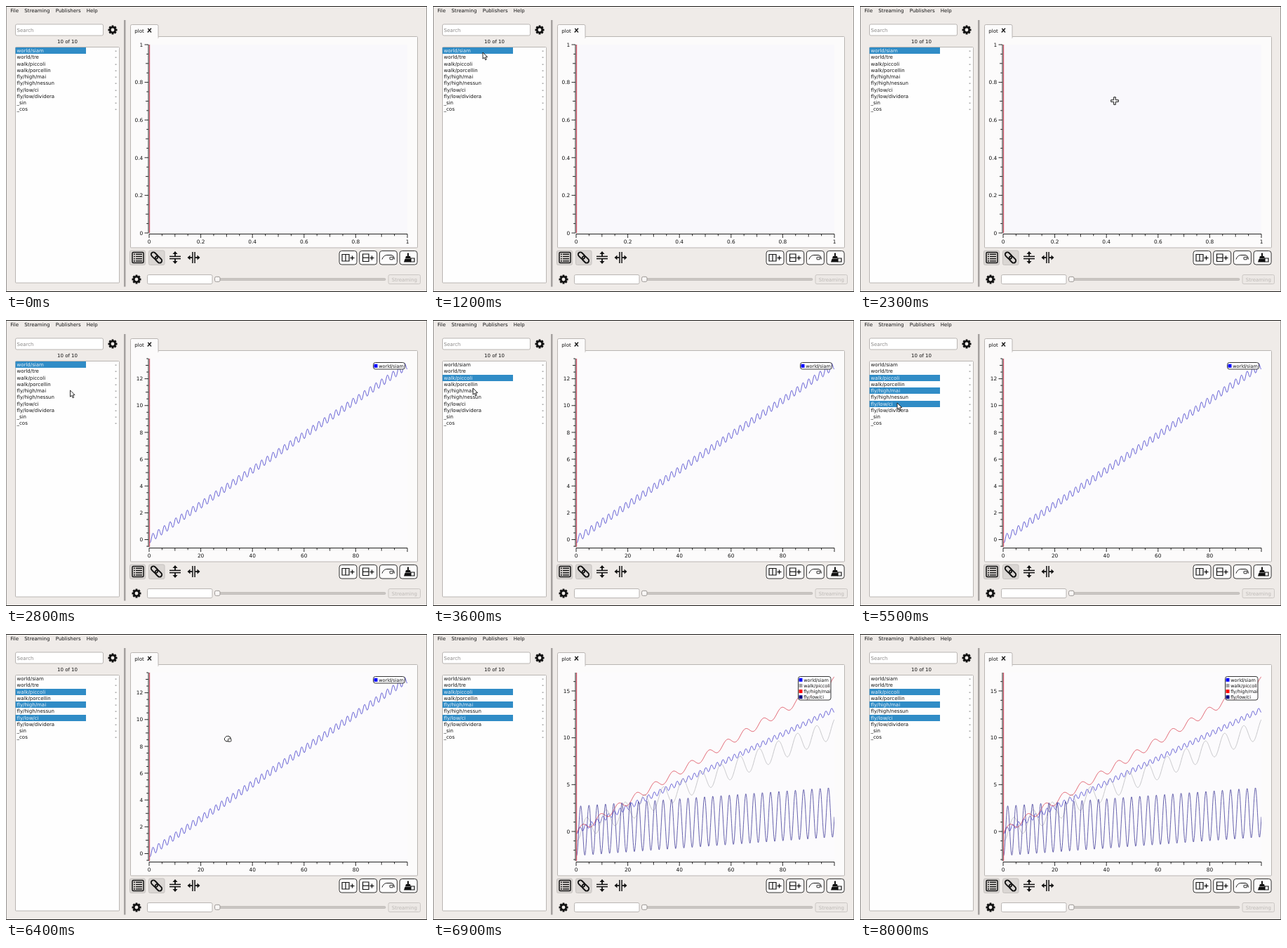
Recreate the animation shown at these times as an HTML page with a canvas. Size 600 by 407 pixels, loop 8.1 s.

```html
<!DOCTYPE html>
<html lang="en">
<head>
<meta charset="utf-8">
<title>Plot drag and drop</title>
<style>
  html, body { margin: 0; width: 100%; height: 100%; overflow: hidden; background: #efebe8; }
  canvas { display: block; width: 600px; height: 407px; }
</style>
</head>
<body>
<canvas id="stage"></canvas>
<script>
const LOOP = 8100, STEP = 100;
const canvas = document.getElementById('stage');
const ctx = canvas.getContext('2d');
const ratio = window.devicePixelRatio || 1;
canvas.width = 600 * ratio;
canvas.height = 407 * ratio;

const PLOT = { left: 204, right: 572, top: 55, bottom: 323 };
const INK = '#111', EDGE = '#b9b5b2', HIGHLIGHT = '#308cc6';
const ROWS = ['world/siam', 'world/tre', 'walk/piccoli', 'walk/porcellin', 'fly/high/mai',
  'fly/high/nessun', 'fly/low/ci', 'fly/low/dividera', '_sin', '_cos'];

// Each signal is amp * sin(freq * x + phase) + slope * x + base.
const SIGNALS = [
  { name: 'world/siam', color: '#0000ff', line: '#3a34c8', amp: 0.28, freq: 2.837, phase: -2.6, slope: 0.13, base: 0 },
  { name: 'walk/piccoli', color: '#a0a0a4', line: '#b8b8bb', amp: 1.05, freq: 0.847, phase: -1.88, slope: 0.11, base: 0 },
  { name: 'fly/high/mai', color: '#ff0000', line: '#d83040', amp: 0.4, freq: 0.897, phase: -0.55, slope: 0.162, base: -0.05 },
  { name: 'fly/low/ci', color: '#000080', line: '#403c98', amp: 2.65, freq: 1.965, phase: -1.907, slope: 0.02, base: 0.05 }
];

const VIEWS = [
  { from: 0, xMax: 1, xStep: 0.2, xMinor: 4, yMin: 0, yMax: 1, yStep: 0.2, yMinor: 4, signals: 0 },
  { from: 2400, xMax: 100, xStep: 20, xMinor: 4, yMin: -0.55, yMax: 13.5, yStep: 2, yMinor: 4, signals: 1 },
  { from: 6900, xMax: 100, xStep: 20, xMinor: 4, yMin: -3.15, yMax: 16.95, yStep: 5, yMinor: 5, signals: 4 }
];

// Pointer path: time, x, y
const PATH = [
  [500, 260, 396], [1200, 71, 66], [1500, 70, 66], [2000, 363, 135], [2400, 363, 135],
  [2900, 60, 96], [3000, 51, 91], [3100, 52, 80], [3400, 52, 80], [3600, 57, 97],
  [3700, 57, 104], [3800, 56, 100], [4300, 56, 100], [4700, 55, 121], [4900, 53, 118],
  [5900, 53, 118], [6400, 316, 149], [6900, 316, 149]
];

function rect(x, y, w, h, { fill, stroke, radius = 0, width = 1 } = {}) {
  ctx.beginPath();
  ctx.roundRect(x, y, w, h, radius);
  if (fill) { ctx.fillStyle = fill; ctx.fill(); }
  if (stroke) { ctx.strokeStyle = stroke; ctx.lineWidth = width; ctx.stroke(); }
}

function text(value, x, y, { size = 7, color = INK, align = 'left' } = {}) {
  ctx.font = `${size}px "DejaVu Sans", sans-serif`;
  ctx.textAlign = align;
  ctx.textBaseline = 'alphabetic';
  ctx.fillStyle = color;
  ctx.fillText(value, x, y + size * 0.365);
}

function line(points, color = INK, width = 1) {
  ctx.beginPath();
  points.forEach(([x, y]) => ctx.lineTo(x, y));
  ctx.strokeStyle = color;
  ctx.lineWidth = width;
  ctx.stroke();
}

function shape(points, fill, stroke, width = 1) {
  ctx.beginPath();
  points.forEach(([x, y]) => ctx.lineTo(x, y));
  ctx.closePath();
  if (fill) { ctx.fillStyle = fill; ctx.fill(); }
  if (stroke) { ctx.strokeStyle = stroke; ctx.lineWidth = width; ctx.stroke(); }
}

function at(x, y, angle, draw) {
  ctx.save();
  ctx.translate(x, y);
  ctx.rotate(angle);
  draw();
  ctx.restore();
}

function gear(x, y) {
  for (let i = 0; i < 4; i++) {
    at(x, y, i * Math.PI / 4, () => rect(-1.5, -6.5, 3, 13, { fill: INK, radius: 0.6 }));
  }
  ctx.beginPath();
  ctx.arc(x, y, 4.9, 0, 7);
  ctx.fillStyle = INK;
  ctx.fill();
  ctx.beginPath();
  ctx.arc(x, y, 2.4, 0, 7);
  ctx.fillStyle = '#efebe8';
  ctx.fill();
}

function splitArrows(x, y, angle) {
  at(x, y, angle, () => {
    line([[-8, -1.6], [8, -1.6]], INK, 1.5);
    line([[-8, 1.6], [8, 1.6]], INK, 1.5);
    for (const side of [-1, 1]) {
      line([[0, side * 2], [0, side * 6]], INK, 1.8);
      shape([[-3.5, side * 5], [3.5, side * 5], [0, side * 9]], INK);
    }
  });
}

function plus(x, y) {
  line([[x - 3, y], [x + 3, y]], INK, 1.3);
  line([[x, y - 3], [x, y + 3]], INK, 1.3);
}

function toolbar() {
  rect(176.5, 348, 22, 20.5, { fill: '#dad6d3', stroke: '#c6c2bf', radius: 2 });
  rect(180, 350.5, 16, 15, { stroke: INK, radius: 1.5, width: 1.5 });
  for (let i = 0; i < 4; i++) {
    const y = 353.3 + i * 3.2;
    rect(182, y - 0.8, 1.8, 1.6, { fill: INK });
    line([[185, y], [194, y]], INK, 1.4);
  }
  rect(203.5, 348, 22.5, 20.5, { fill: '#dad6d3', stroke: '#c6c2bf', radius: 2 });
  at(214.5, 358, Math.PI / 4, () => {
    for (const x of [-9.5, -1.5]) rect(x, -3.2, 11, 6.4, { stroke: INK, radius: 3.2, width: 1.9 });
  });
  splitArrows(241, 358, 0);
  splitArrows(267.5, 358, Math.PI / 2);

  for (let i = 0; i < 4; i++) {
    rect(475 + i * 28.7, 348.5, 25, 19.5, { fill: '#fdfcfc', stroke: '#333', radius: 3.5 });
  }
  rect(479, 353.5, 10, 9.5, { stroke: INK, width: 1.2 });
  line([[484, 353], [484, 363]], INK, 1.2);
  plus(493.5, 358.5);
  rect(508.5, 353, 8.5, 10.5, { stroke: INK, width: 1.2 });
  line([[508, 358.2], [517, 358.2]], INK, 1.2);
  plus(521.5, 358.5);

  ctx.beginPath();
  ctx.moveTo(536, 360.5);
  ctx.bezierCurveTo(538, 355, 541, 354.5, 544, 354.5);
  ctx.lineTo(549, 354.5);
  ctx.quadraticCurveTo(553, 355, 553.5, 360.5);
  ctx.strokeStyle = INK;
  ctx.lineWidth = 1;
  ctx.stroke();
  rect(547, 357.3, 4.5, 3.5, { fill: '#fff', stroke: INK, radius: 0.6, width: 0.9 });

  line([[573, 351.5], [573, 357]], INK, 2);
  shape([[570, 356], [576, 356], [577, 359.5], [569, 359.5]], INK);
  shape([[568.5, 360], [577, 360], [577, 364.5], [567, 364.5]], INK);
  rect(577, 359, 5, 5, { fill: '#fff', stroke: INK, width: 1.2 });
}

function playback() {
  gear(186, 389);
  rect(201.5, 382.5, 92.5, 13, { fill: '#fff', stroke: EDGE, radius: 2 });
  rect(300, 387.5, 241, 3, { fill: '#c9c5c2', stroke: '#b4b0ad', radius: 1.5, width: 0.6 });
  rect(297.5, 385.3, 7.5, 7, { fill: '#f8f6f5', stroke: '#9d9996', radius: 2 });
  rect(545, 382.5, 45.5, 13, { fill: '#ece8e5', stroke: '#cbc7c4', radius: 2 });
  text('Streaming', 567.8, 389, { color: '#bdb9b6', align: 'center' });
}

function sidebar(t) {
  rect(13.5, 26, 125, 16, { fill: '#fff', stroke: EDGE, radius: 2 });
  text('Search', 15.5, 34, { color: '#8b8988' });
  gear(152, 34);
  text('10 of 10', 87.5, 50.5, { align: 'center' });
  rect(13.5, 58.5, 148, 335.5, { fill: '#fefefe', stroke: EDGE, radius: 1 });

  const selected = t < 3300 ? [0] : [2];
  if (t >= 4000) selected.push(4);
  if (t >= 5100) selected.push(6);
  ROWS.forEach((name, i) => {
    const y = 63.6 + i * 9.25, on = selected.includes(i);
    if (on) rect(13.5, Math.round(y - 4.6), 100.5, 9, { fill: HIGHLIGHT });
    text(name, 15.5, y, { color: on ? '#e8f1f8' : INK });
    text('-', 155.3, y);
  });
  rect(168, 20, 2.5, 379.5, { fill: '#a5a19f' });
}

function ticks(from, to, step, minor, draw) {
  const unit = step / minor;
  for (let i = Math.ceil(from / unit - 1e-6); i * unit <= to + 1e-6; i++) {
    const major = i % minor === 0;
    const medium = minor % 2 === 0 && Math.abs(i % minor) === minor / 2;
    draw(i * unit, major ? 5.5 : medium ? 4 : 2.8, major);
  }
}

function legend(count) {
  const single = count === 1;
  const x = single ? 523.5 : 520.5;
  rect(x, 60.5, single ? 45 : 46.5, single ? 9.5 : 33.5,
    { fill: 'rgba(255,255,255,.85)', stroke: '#222', radius: 3, width: 0.9 });
  SIGNALS.slice(0, count).forEach(({ name, color }, i) => {
    const y = 65.3 + i * 8.15;
    rect(x + 1, y - 2.5, 5, 5, { fill: color });
    text(name, x + 7.7, y, { size: 6.5 });
  });
}

function plot(t) {
  const view = VIEWS.findLast(v => t >= v.from);
  const { left, right, top, bottom } = PLOT;
  const px = x => left + x / view.xMax * (right - left);
  const py = y => bottom - (y - view.yMin) / (view.yMax - view.yMin) * (bottom - top);
  const label = v => String(+v.toFixed(2));

  rect(177.5, 43.5, 409, 300.5, { fill: '#fcfbfb', stroke: EDGE, radius: 1 });
  rect(177.5, 26.5, 39.5, 19, { fill: '#fcfbfb', stroke: EDGE, radius: [2, 2, 0, 0] });
  rect(178, 44, 38.5, 3, { fill: '#fcfbfb' });
  text('plot', 183.3, 35);
  line([[201.8, 37.5], [207, 31.8]], INK, 1.4);
  line([[202.3, 32], [207, 37.5]], INK, 1.2);

  rect(left, top, right - left, bottom - top, { fill: view.signals ? '#fcfbfd' : '#f9f8fc' });
  line([[203, top], [203, bottom]], '#222');
  line([[left, 324.5], [right, 324.5]], '#222');
  ticks(view.yMin, view.yMax, view.yStep, view.yMinor, (v, size, major) => {
    line([[203 - size, py(v)], [203, py(v)]], INK, 0.9);
    if (major) text(label(v), 195.2, py(v), { size: 7.4, align: 'right' });
  });
  ticks(0, view.xMax, view.xStep, view.xMinor, (v, size, major) => {
    line([[px(v), 324.5], [px(v), 324.5 + size]], INK, 0.9);
    if (major && v < 99) text(label(v), px(v), 335.3, { size: 7.4, align: 'center' });
  });

  ctx.save();
  ctx.beginPath();
  ctx.rect(left, top, right - left, bottom - top);
  ctx.clip();
  SIGNALS.slice(0, view.signals).forEach(s => {
    const points = [];
    for (let x = 0; x <= 100; x += 0.1) {
      points.push([px(x), py(s.amp * Math.sin(s.freq * x + s.phase) + s.slope * x + s.base)]);
    }
    line(points, s.line, 0.8);
  });
  ctx.restore();
  line([[204.6, top], [204.6, bottom]], '#d04a60', 1.1);
  if (view.signals) legend(view.signals);
}

function arrow(x, y) {
  shape([[x, y], [x, y + 9.2], [x + 2.1, y + 7.3], [x + 3.7, y + 10.8], [x + 5.2, y + 10.1],
    [x + 3.7, y + 6.8], [x + 6.6, y + 6.6]], '#fff', INK, 0.9);
}

function cross(x, y) {
  const a = 5.3, b = 1.3;
  shape([[-b, -a], [b, -a], [b, -b], [a, -b], [a, b], [b, b], [b, a], [-b, a], [-b, b], [-a, b], [-a, -b], [-b, -b]]
    .map(([dx, dy]) => [x + dx, y + dy]), '#fff', INK, 1);
}

function grab(x, y) {
  ctx.beginPath();
  ctx.moveTo(x - 2.5, y + 3.8);
  ctx.quadraticCurveTo(x - 5.5, y + 1.5, x - 4.5, y - 0.5);
  ctx.quadraticCurveTo(x - 3.5, y - 1.5, x - 3, y - 2.5);
  ctx.quadraticCurveTo(x - 2, y - 4.3, x - 0.5, y - 3.4);
  ctx.quadraticCurveTo(x + 1, y - 4.5, x + 2, y - 3);
  ctx.quadraticCurveTo(x + 4.2, y - 3, x + 4.2, y);
  ctx.quadraticCurveTo(x + 4, y + 2.5, x + 2.8, y + 3.8);
  ctx.closePath();
  ctx.fillStyle = '#fff';
  ctx.fill();
  ctx.strokeStyle = INK;
  ctx.lineWidth = 1;
  ctx.stroke();
  rect(x + 0.5, y, 4.5, 4, { fill: '#fff', stroke: INK, radius: 1, width: 0.8 });
}

function pointer(t) {
  const next = PATH.findIndex(([time]) => time > t);
  if (next < 1) return;
  const [t0, x0, y0] = PATH[next - 1], [t1, x1, y1] = PATH[next];
  const k = (t - t0) / (t1 - t0);
  const ease = k * k * (3 - 2 * k);
  const x = x0 + (x1 - x0) * ease, y = y0 + (y1 - y0) * ease;
  const dragging = (t >= 1600 && t < 2300) || (t >= 6000 && t < 6800);
  const overPlot = x > PLOT.left && y > PLOT.top && y < PLOT.bottom;
  (dragging ? grab : overPlot ? cross : arrow)(x, y);
}

function windowFrame() {
  for (const y of [0.5, 406.5]) line([[0, y], [600, y]], '#1c1b1a');
  for (const x of [0.25, 599.75]) line([[x, 0], [x, 407]], '#4a4846', 0.7);
}

function render(t) {
  ctx.setTransform(ratio, 0, 0, ratio, 0, 0);
  rect(0, 0, 600, 407, { fill: '#efebe8' });
  [['File', 6.3], ['Streaming', 26.3], ['Publishers', 70.8], ['Help', 114.7]]
    .forEach(([name, x]) => text(name, x, 6.8));
  sidebar(t);
  plot(t);
  toolbar();
  playback();
  windowFrame();
  pointer(t);
}

function tick() {
  const t = performance.now() % LOOP;
  render(Math.floor(t / STEP) * STEP);
  requestAnimationFrame(tick);
}
tick();
</script>
</body>
</html>
```
